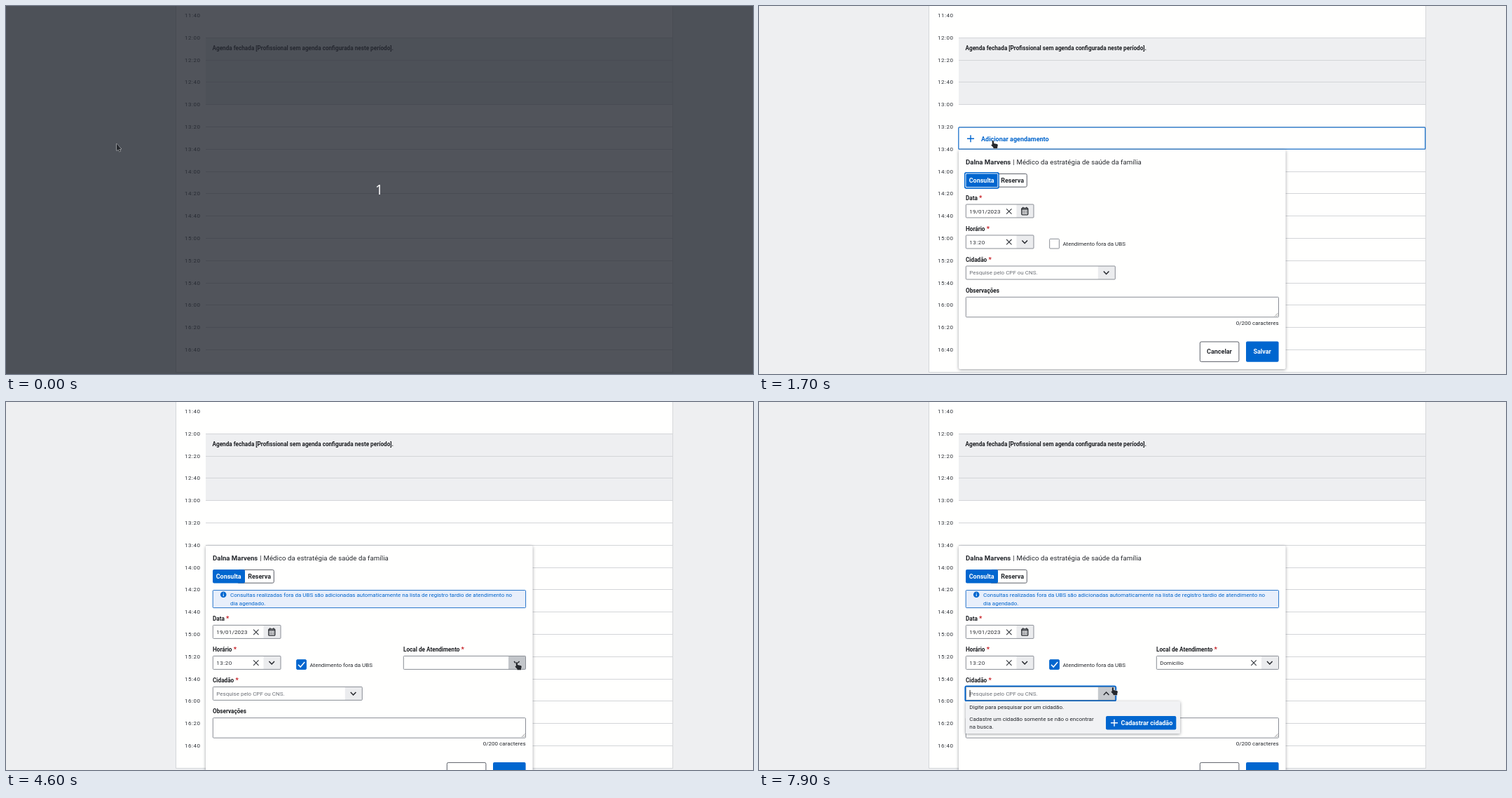
An HTML page that plays this animation: 1066 by 525 pixels, repeating every 8000 ms.

```html
<!DOCTYPE html>
<html lang="pt-BR">
<head>
<meta charset="utf-8">
<title>Agendamento</title>
<style>
html, body { margin: 0; width: 100%; height: 100%; overflow: hidden; background: #eeeff1; }
svg { display: block; width: 100vw; height: 100vh; }
text { font-family: Roboto, "Open Sans", sans-serif; font-size: 8px; fill: #24272c; white-space: pre; }
.num { letter-spacing: .5px; fill: #2e3238; }
.date { letter-spacing: .17px; }
.label { font-size: 8.2px; font-weight: 700; fill: #1c1e22; }
.head { font-size: 9.6px; letter-spacing: .07px; }
.name { font-size: 9.6px; font-weight: 700; }
.btn { font-size: 9px; font-weight: 700; }
.blue { fill: #0064cc; }
.white { fill: #fff; }
.hint { fill: #6c7077; }
.count { font-family: "Open Sans", "Noto Sans", sans-serif; font-size: 19.5px; fill: #fff; }
.req { fill: #c4161c; }
.card { filter: drop-shadow(0 1px 2px rgba(20, 25, 35, .42)); }
</style>
</head>
<body>
<svg id="stage" viewBox="0 0 1066 525" preserveAspectRatio="none"></svg>
<script>
const LOOP = 8000, STEP = 100, SHIFT = 35.4;
const BLUE = '#0066cf', EDGE = '#898d94', SOFT = '#eeeff1', INK = '#24272c', PAPER = '#fffffe';
const stage = document.getElementById('stage');

// time, x, y of the pointer tip
const PATH = [
  [400, 158, 197], [500, 166, 203], [700, 232, 217], [900, 303, 212], [1100, 331, 198], [1300, 334, 192],
  [1800, 334, 192], [1900, 340, 197], [2200, 390, 253], [2600, 455, 327], [2700, 439, 335],
  [3200, 420, 339], [3300, 420, 339], [3400, 425, 340], [3800, 560, 360], [4200, 721, 374], [4400, 729, 371],
  [4700, 729, 371], [4800, 716, 389], [6600, 716, 389], [6700, 700, 340], [6900, 665, 225],
  [7100, 758, 110], [7200, 715, 160], [7400, 481, 402], [7500, 496, 411], [7900, 505, 407]
];

function pointer(t) {
  const i = PATH.findIndex(p => p[0] >= t);
  if (i < 1) return (i ? PATH[PATH.length - 1] : PATH[0]).slice(1);
  const a = PATH[i - 1], b = PATH[i], k = (t - a[0]) / (b[0] - a[0]);
  return [a[1] + (b[1] - a[1]) * k, a[2] + (b[2] - a[2]) * k];
}

const inside = ([x, y], l, t, r, b) => x >= l && x <= r && y >= t && y <= b;
const rowY = i => Math.round(13 + 31.8 * i);

const text = (x, y, s, cls = '', anchor = 'start') =>
  `<text x="${x}" y="${y}" class="${cls}" text-anchor="${anchor}">${s}</text>`;
const rect = (l, t, r, b, fill, extra = '') =>
  `<rect x="${l}" y="${t}" width="${r - l}" height="${b - t}" fill="${fill}" ${extra}/>`;
const line = (d, color, w = 1.2) => `<path d="${d}" fill="none" stroke="${color}" stroke-width="${w}"/>`;
const group = (dy, s, extra = '') => `<g transform="translate(0 ${dy})" ${extra}>${s}</g>`;
const stroke = (color, w = 1, rx = 1) => `stroke="${color}" stroke-width="${w}" rx="${rx}"`;
const ring = (l, t, r, b) => rect(l - 1, t - 1, r + 1, b + 1, 'none', stroke(BLUE, 1.8, 2));

const cross = (x, y) => line(`M${x - 3.7} ${y - 3.7}l7.4 7.4m0-7.4l-7.4 7.4`, '#33373d', 1.1);
const plus = (x, y, color) => line(`M${x - 5} ${y}h10m-5-5v10`, color, 1.4);
const chevron = (x, y, up) => line(`M${x - 3.8} ${y + (up ? 2 : -2)}l3.8 ${up ? -3.9 : 3.9} 3.8 ${up ? 3.9 : -3.9}`, INK, 1.5);
const caret = (x, y) => rect(x, y, x + .9, y + 10, '#111');
const label = (x, y, s, req = true) =>
  text(x, y, s + (req ? '<tspan class="req" dx="2.2" font-size="9.5">*</tspan>' : ''), 'label');

function field(l, t, r, body, tint = '#ebecee') {
  return rect(l, t, r, t + 19, PAPER) + rect(r - 24.5, t, r, t + 19, tint) +
    rect(l, t, r, t + 19, 'none', stroke(EDGE)) + body;
}

function calendarIcon(x, y) {
  let dots = '';
  for (let i = 0; i < 6; i++) dots += rect(x - 3 + i % 3 * 2.4, y + (i < 3 ? -.6 : 1.8), x - 1.7 + i % 3 * 2.4, y + (i < 3 ? .6 : 3), INK);
  return rect(x - 4.5, y - 4.3, x + 4.5, y + 5, 'none', stroke(INK, 1.3)) +
    line(`M${x - 4.5} ${y - 2.6}h9`, INK, 1.2) + line(`M${x - 2.5} ${y - 6}v2m5-2v2`, INK, 1.3) + dots;
}

function agenda() {
  let s = rect(0, 0, 1066, 525, SOFT) + rect(242.5, -5, 951.5, 522.5, PAPER, stroke('#d5d7da', 1, 0)) +
    rect(285, 45, 951, 141, SOFT);
  for (let i = 0; i < 16; i++) {
    const y = rowY(i), min = 700 + i * 20;
    if (i) s += rect(285, y, 951, y + 1, '#d3d5d8');
    s += text(277.4, y + 3.1, `${Math.floor(min / 60)}:${String(min % 60).padStart(2, '0')}`, 'num', 'end');
  }
  return s + text(294.5, 63, 'Agenda fechada [Profissional sem agenda configurada neste período].', 'label');
}

function slot(i, pressed) {
  const y = rowY(i);
  return rect(284.8, y + 1.2, 950.7, y + 32.2, pressed ? '#e6effb' : PAPER, stroke('#1f74cc', 1.3)) +
    plus(302, y + 17.3, BLUE) + text(317, y + 20.5, 'Adicionar agendamento', 'btn blue');
}

function notice() {
  return rect(295.2, 268.6, 741.6, 293.6, '#e8effb', stroke('#2473cb')) +
    `<circle cx="310.2" cy="274.8" r="4.3" fill="${BLUE}"/>` +
    rect(309.7, 274.2, 310.8, 277.2, '#fff') + rect(309.7, 272.3, 310.8, 273.3, '#fff') +
    text(320, 277.6, 'Consultas realizadas fora da UBS são adicionadas automaticamente na lista de registro tardio de atendimento no', 'blue') +
    text(320, 289.8, 'dia agendado.', 'blue');
}

function placeField(t, tip) {
  const open = t >= 4700 && t < 6100, chosen = t >= 6100;
  const over = inside(tip, 717, 361, 742, 382);
  const tint = over ? (t >= 4600 ? '#c3c6ca' : '#d6d9dc') : '#ebecee';
  let s = label(567, 321, 'Local de Atendimento') +
    field(567.3, 327, 741.5, chevron(728.8, 336.6, open), tint);
  if (chosen) s += text(572.3, 339.4, 'Domicílio') + cross(706, 336.7);
  if (t >= 4700 && t < 7600) s += ring(567.3, 327, 741.5, 346);
  if (open && (t < 5300 || t >= 5900)) s += caret(573, 331.8);
  return s;
}

function placeMenu(t) {
  const items = ['Domicílio', 'Escola/Creche', 'Instituição/Abrigo', 'Outros', 'Polo (academia da saúde)', 'Rua', 'Unidade móvel'];
  return rect(567.5, 383, 741.5, 540, '#f2f3f5', 'class="card" rx="1"') +
    (t >= 5500 ? rect(569, 383.5, 729, 404, '#dcdfe3') : '') +
    items.map((s, i) => text(572.3, 396.6 + i * 20.7, s)).join('') +
    rect(730, 383.5, 741, 525, '#e8e9eb') + rect(732, 385, 739, 480, '#b9bcc1', 'rx="3"');
}

function citizenMenu() {
  return rect(295, 427, 601, 473, '#f1f2f4', 'class="card" rx="1"') +
    text(300.3, 437.7, 'Digite para pesquisar por um cidadão.') +
    text(300.3, 454.6, 'Cadastre um cidadão somente se não o encontrar') +
    text(300.3, 466.4, 'na busca.') +
    rect(495, 448, 595.3, 467.6, BLUE, 'rx="2"') + plus(507, 457.7, '#fff') +
    text(516.5, 460.9, 'Cadastrar cidadão', 'btn white');
}

function dialog(t, tip) {
  const away = t >= 3400, dy = away ? SHIFT : 0;
  const searching = t >= 7600, listed = t >= 7700;
  const citizenTint = away && inside(tip, 484, 406, 509, 426) ? '#c6c9cd' : '#ebecee';

  let s = rect(285, 205, 751.6, 518 + dy, PAPER, 'class="card" rx="2"') +
    text(295, 225.5, 'Dalna Marvens', 'name') + text(362.3, 225.5, '|', 'head') +
    text(367.5, 225.5, 'Médico da estratégia de saúde da família', 'head') +
    rect(330, 239.4, 382.3, 258.2, PAPER, stroke('#5c6068', 1, 2)) +
    rect(295, 239, 341, 258.6, BLUE, 'rx="2"') +
    text(317.7, 252, 'Consulta', 'btn white', 'middle') + text(361.6, 252, 'Reserva', 'btn', 'middle');
  if (!away) s += rect(293.8, 237.8, 342, 259.8, 'none', stroke(BLUE, 1.7, 2)) + rect(295, 239, 340.8, 258.6, 'none', stroke('#fff', .8));
  else s += notice();

  let form = label(295, 277, 'Data') +
    field(295.3, 283, 392, text(300.3, 295.6, '19/01/2023', 'date') + cross(356.8, 293) + calendarIcon(379.3, 292.8)) +
    label(295, 321, 'Horário') +
    field(295.3, 327, 392, text(300.3, 339.5, '13:20', 'num') + cross(356.8, 336.7) + chevron(379.2, 336.6)) +
    rect(414.7, 332.3, 428.4, 346, away ? BLUE : PAPER, stroke(away ? BLUE : EDGE)) +
    text(433.4, 342.3, 'Atendimento fora da UBS') +
    label(295, 365, 'Cidadão') +
    field(295.3, 371, 508.3, text(300.3, 383.3, 'Pesquise pelo CPF ou CNS.', 'hint') + chevron(495.6, 380.6, listed), citizenTint) +
    label(295, 409, 'Observações', false) +
    rect(295.3, 415.3, 741.5, 443.8, PAPER, stroke(EDGE)) +
    line('M736 442.6l4.6-4.6m-2 4.6l2-2', '#777', .7) +
    text(741.6, 455, '0/200 caracteres', '', 'end') +
    rect(629.3, 479, 684.9, 507.4, PAPER, stroke('#5c6068', 1, 2)) + text(657, 496.3, 'Cancelar', 'btn', 'middle') +
    rect(695, 478.6, 741.6, 507.8, BLUE, 'rx="2"') + text(718.2, 496.3, 'Salvar', 'btn white', 'middle');

  if (away) {
    form += line('M417 339.3l3.2 3.4 6-7', '#fff', 1.5) + placeField(t, tip);
    if (t < 4600) form += ring(414, 331.7, 429.2, 346.7);
  }
  if (searching) form += ring(295.3, 371, 508.3, 390) + caret(300.6, 375.5);
  s += group(dy, form);
  if (t >= 4700 && t < 6100) s += placeMenu(t);
  if (listed) s += citizenMenu();
  return group(0, s, t < 1700 ? 'opacity=".5"' : '');
}

function cursor(t, [x, y], hand) {
  const d = hand
    ? 'M-1.3 .9Q0-.7 1.1 .9V4L5.8 5Q7 5.4 6.8 7L6.2 9.3V11.2H.4V9.8L-2.6 6.8Q-2.6 5.4-1.3 5.8Z'
    : 'M0-.4V9.4L2.2 7.4 3.8 10.9 5.3 10.2 3.8 6.9H6.7Z';
  return `<path transform="translate(${x} ${y})" d="${d}" fill="#25282d" stroke="#fff" stroke-width=".8" paint-order="stroke"/>`;
}

function scene(t) {
  const tip = pointer(t), [x, y] = tip;
  const opened = t >= 1600;
  const row = x > 285 && x < 951 && y < 236 && (!opened || y < 205) ? (y < 204.5 ? 5 : 6) : 0;
  const hand = row > 0 ||
    (t >= 2700 && t < 3400 && inside(tip, 414, 332, 524, 347)) ||
    (t >= 3400 && inside(tip, 717, 361, 742, 382)) ||
    (t >= 4800 && t < 6100) ||
    (t >= 7400 && inside(tip, 484, 406, 509, 426));

  let s = agenda();
  if (row) s += slot(row, t === 1500);
  if (opened) s += dialog(t, tip);
  if (t < 100) s += rect(0, 0, 1066, 525, '#262a32', 'opacity=".8"') + text(532.5, 269, '1', 'count', 'middle');
  return s + cursor(t, tip, hand);
}

let shown = -1;
function tick(now) {
  const t = Math.floor(now % LOOP / STEP) * STEP;
  if (t !== shown) stage.innerHTML = scene(shown = t);
  requestAnimationFrame(tick);
}
tick(performance.now());
</script>
</body>
</html>
```
